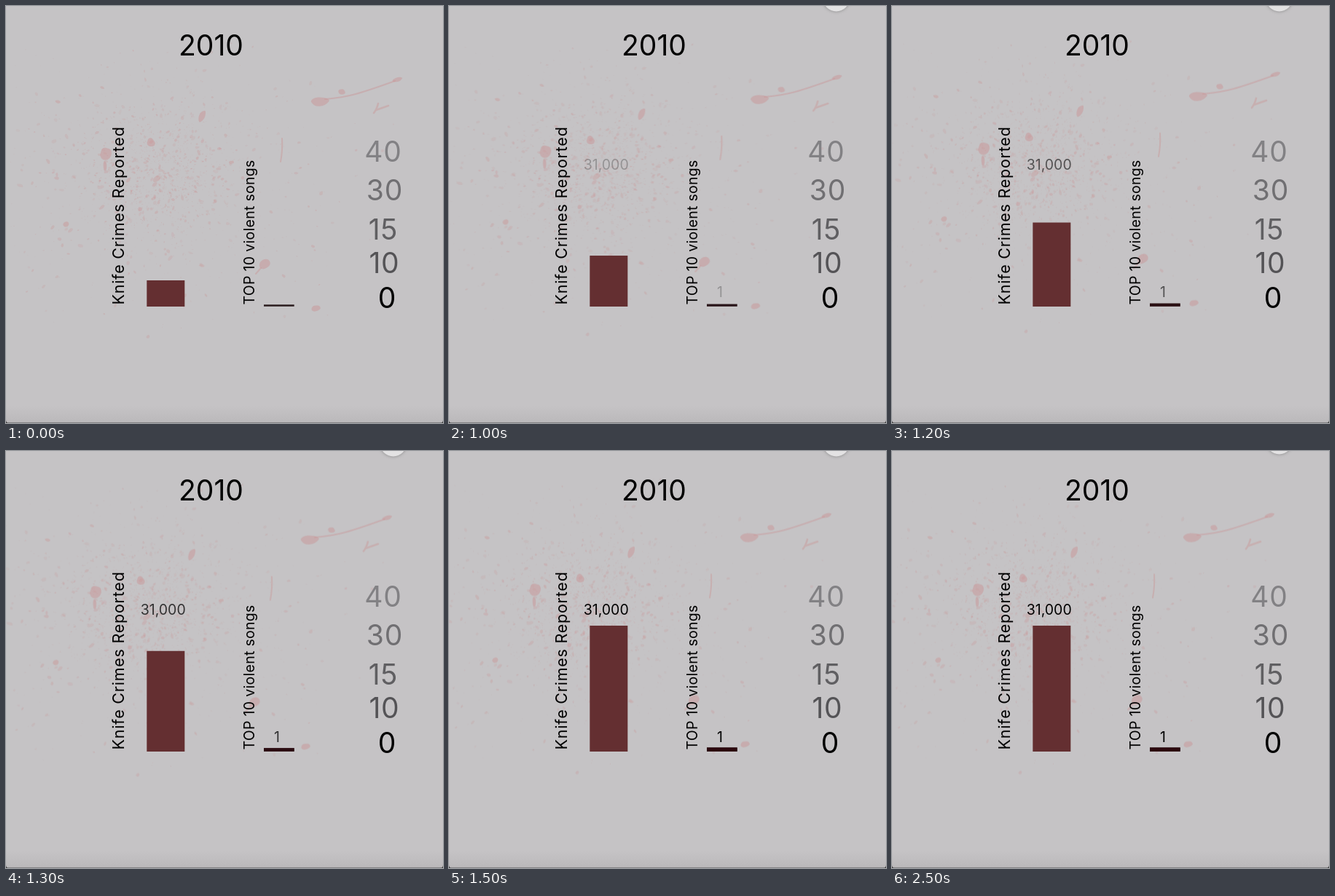
Write an HTML page with a canvas that moves like this. It is 600 by 573 pixels and loops after 3.6 s.

```html
<!DOCTYPE html>
<html lang="en">
<head>
<meta charset="utf-8">
<title>Knife crimes and violent songs</title>
<style>
@property --t { syntax: "<number>"; inherits: true; initial-value: 0; }
html, body { margin: 0; width: 100%; height: 100%; overflow: hidden; }
#stage {
  --p: min(1, var(--t));
  position: relative; width: 600px; height: 573px; overflow: hidden;
  background: linear-gradient(#c5c3c5 550px, #bbb9bb 571px);
  animation: grow 3600ms step-end infinite;
}
canvas, svg { position: absolute; left: 0; top: 0; }
canvas { transform: translate(calc(-19px * var(--p)), calc(-12.5px * var(--p))); }
text { font-family: Inter, Roboto, sans-serif; font-weight: 400; text-anchor: middle; }
.big { font-size: 39px; }
.axis { letter-spacing: .8px; }
.value { font-size: 19.5px; opacity: var(--p); }
.label { text-anchor: start; }
#crimes {
  fill: #642f31;
  y: calc(377px - 137px * var(--p)); height: calc(36px + 137px * var(--p));
}
.songs { y: calc(410.3px - 2.8px * var(--p)); height: calc(2.5px + 2.8px * var(--p)); fill: #2b1c1e; }
.tint { fill: #2b070d; opacity: var(--p); }
#knob { filter: drop-shadow(0 0 2px #666a); animation: knob 3600ms step-end infinite; }
/* One step every 100 ms from 0.9 s to 1.5 s */
@keyframes grow {
  0% { --t: 0; }
  25% { --t: .082; animation-timing-function: steps(6); }
  41.66%, 100% { --t: 1.078; }
}
@keyframes knob {
  0% { opacity: 0; transform: none; }
  25% { opacity: 1; transform: none; }
  61.11% { opacity: 1; transform: translateY(-1px); }
  63.88% { opacity: 1; transform: translateY(-2px); }
  69.44%, 100% { opacity: 1; transform: translateY(-3px); }
}
</style>
</head>
<body>
<div id="stage">
  <canvas id="spatter" width="600" height="573"></canvas>
  <svg width="600" height="573" viewBox="0 0 600 573">
    <path d="M0 569Q0 573 4 573H0ZM600 569Q600 573 596 573H600Z" fill="#333"/>
    <path d="M2 572.6H598" stroke="#77767a" stroke-width=".9"/>
    <rect id="crimes" x="193.3" width="52"/>
    <rect class="songs" x="354" width="41.7"/>
    <rect class="songs tint" x="354" width="41.7"/>
    <text class="big" x="281.5" y="67.5">2010</text>
    <text class="label" transform="translate(162 410.5) rotate(-90)" font-size="21.5" letter-spacing=".75">Knife Crimes Reported</text>
    <text class="label" transform="translate(341.3 410.5) rotate(-90)" font-size="19.5" letter-spacing=".3">TOP 10 violent songs</text>
    <text class="value" x="215.7" y="224.7">31,000</text>
    <text class="value" x="372" y="400.3">1</text>
    <g class="big axis">
      <text x="518" y="213.7" fill="#828184">40</text>
      <text x="520" y="267.3" fill="#706f72">30</text>
      <text x="518" y="320.7" fill="#605f62">15</text>
      <text x="519.5" y="367.3" fill="#545356">10</text>
      <text x="523.4" y="414.5">0</text>
    </g>
    <circle id="knob" cx="531.7" cy="-11" r="18.5" fill="#e3e2e3"/>
  </svg>
</div>
<script>
const ctx = document.getElementById("spatter").getContext("2d");
let seed = 41;
const rnd = () => (seed = (seed * 16807) % 2147483647) / 2147483647;
const gauss = () => Math.sqrt(-2 * Math.log(rnd())) * Math.cos(2 * Math.PI * rnd());
const ink = a => `rgba(202,150,151,${a})`;

// Uneven ellipse, smoothed through the midpoints of its corners
function blob(x, y, w, h, angle = 0, alpha = .5) {
  const n = 9;
  const pts = Array.from({ length: n }, (_, i) => {
    const a = i / n * 2 * Math.PI, r = .85 + rnd() * .4;
    return [Math.cos(a) * w / 2 * r, Math.sin(a) * h / 2 * r];
  });
  ctx.save();
  ctx.translate(x, y);
  ctx.rotate(angle);
  ctx.beginPath();
  for (let i = 0; i <= n; i++) {
    const [ax, ay] = pts[i % n], [bx, by] = pts[(i + 1) % n];
    ctx.quadraticCurveTo(ax, ay, (ax + bx) / 2, (ay + by) / 2);
  }
  ctx.fillStyle = ink(alpha);
  ctx.fill();
  ctx.restore();
}

function streak(d, width) {
  ctx.lineWidth = width;
  ctx.lineCap = ctx.lineJoin = "round";
  ctx.strokeStyle = ink(.45);
  ctx.stroke(new Path2D(d));
}

// Drops thrown outwards from the core, stretched along their flight
function spray(count, spreadX, spreadY, maxSize, alpha) {
  for (let i = 0; i < count; i++) {
    const x = 210 + gauss() * spreadX, y = 226 + gauss() * spreadY;
    if (x < 2 || x > 545 || y < 48 || y > 462) continue;
    const size = .7 + rnd() ** 4 * maxSize;
    const angle = Math.atan2(y - 226, x - 210) + gauss() * .6;
    blob(x, y, size * (1 + rnd()), size, angle, alpha * (.5 + rnd()));
  }
}
spray(1100, 52, 48, 3, .24);
spray(800, 115, 85, 4, .22);
spray(45, 95, 75, 8, .38);

// Main drops
blob(138, 203, 16, 17);
blob(136, 220, 5, 14);
blob(199, 188, 11, 12);
blob(269, 151, 9, 16, .5);
blob(355, 355, 15, 12, -.4);
blob(426, 415, 13, 8, -.3);
streak("M379 182Q380 198 377 214", 2);
streak("M350 360L343 368", 2);

// Long flick and its small fork
blob(432, 131, 25, 12, -.12);
blob(461, 118, 10, 8, .3);
blob(538, 101, 14, 6, -.35);
streak("M438 128Q462 126 480 121T534 103", 2);
streak("M505 147Q509 142 511 134M508 143L525 137", 2.6);
</script>
</body>
</html>
```
